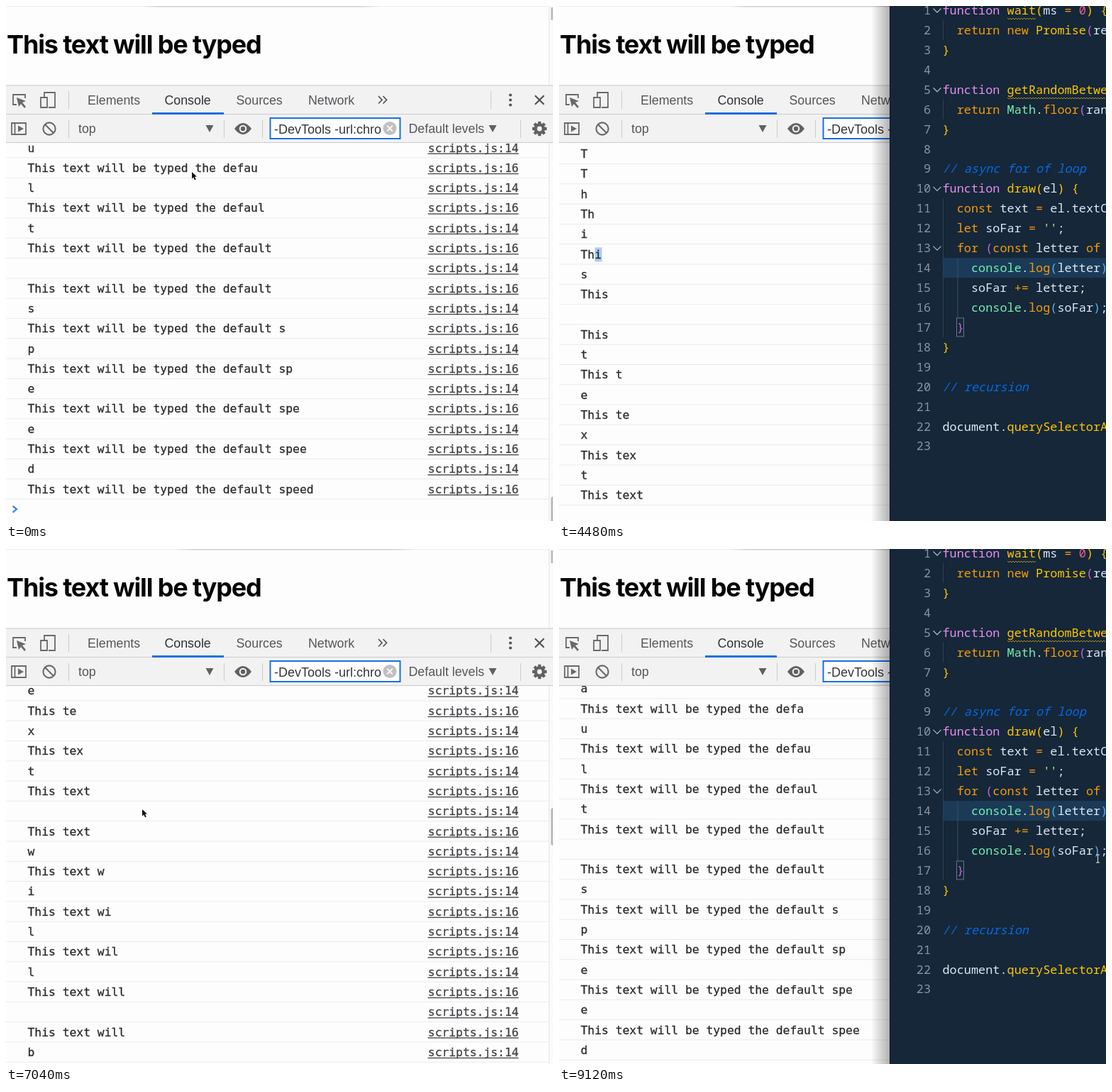
An HTML page with a canvas that plays this animation: 771 by 726 pixels, repeating every 9.28 s.

```html
<!DOCTYPE html>
<html lang="en">
<head>
<meta charset="utf-8">
<title>Console typing log</title>
<style>
  html, body { margin: 0; width: 100%; height: 100%; overflow: hidden; background: #fff; }
  canvas { display: block; }
  h1 {
    position: absolute; left: 1px; top: 36px; margin: 0; white-space: nowrap;
    font: bold 36px/36px Inter, sans-serif; font-optical-sizing: none;
    letter-spacing: -1.15px; color: #050505;
  }
</style>
</head>
<body>
<canvas id="stage" width="771" height="726"></canvas>
<h1>This text will be typed</h1>
<script>
const W = 771, H = 726, LOOP = 9280, STEP = 160;
const ctx = document.getElementById('stage').getContext('2d');
const UI = '17.8px "Liberation Sans", Arial, sans-serif';
const MONO = '16.33px "DejaVu Sans Mono", monospace';
const CODE = '16.86px "Noto Sans Mono", monospace';
const ICON = '#6a6a6a', BLUE = '#1a6fe0', PAPER = '#fefdfe';

// Every letter logs itself, then the text so far.
const logRows = [];
for (const text of ['This text will be typed', 'This text will be typed faster',
                    'This text will be typed the default speed']) {
  for (let i = 0; i < text.length; i++) {
    logRows.push([text[i], 14], [text.slice(0, i + 1), 16]);
  }
}
const ROW = 28.3, TOP = 193, FIRST = 208.4;

const scrollKeys = [[480, 4819.5], [1600, 0], [4960, 0], [5760, 418], [7040, 1650],
                    [7680, 3792], [8320, 4766]];
const mouseKeys = [[480, 262, 234], [1280, 250, 232], [2080, 4, 222], [2400, 40, 266],
                   [2720, 61, 352], [3200, 61, 346], [3840, 70, 460], [4960, 150, 352],
                   [5280, 190, 346], [5760, 190, 346], [7040, 192, 367]];

function track(keys, t) {
  if (t <= keys[0][0]) return keys[0].slice(1);
  for (let i = 1; i < keys.length; i++) {
    const a = keys[i - 1], b = keys[i];
    if (t <= b[0]) {
      const k = (t - a[0]) / (b[0] - a[0]);
      return a.slice(1).map((v, n) => v + (b[n + 1] - v) * k);
    }
  }
  return keys[keys.length - 1].slice(1);
}

function rect(x, y, w, h, color) {
  ctx.fillStyle = color;
  ctx.fillRect(x, y, w, h);
}

function label(text, x, y, color, font = UI, align = 'left') {
  ctx.font = font;
  ctx.fillStyle = color;
  ctx.textAlign = align;
  ctx.fillText(text, x, y);
}

// Log text is a touch heavier than the regular weight.
function logLabel(text, x, y, color) {
  label(text, x, y, color, MONO);
  ctx.strokeStyle = color;
  ctx.lineWidth = 0.3;
  ctx.strokeText(text, x, y);
}

function line(points, color, width = 2, closed = false) {
  ctx.beginPath();
  points.forEach(([x, y]) => ctx.lineTo(x, y));
  if (closed) ctx.closePath();
  ctx.strokeStyle = color;
  ctx.lineWidth = width;
  ctx.stroke();
}

function shape(points, color) {
  ctx.beginPath();
  points.forEach(([x, y]) => ctx.lineTo(x, y));
  ctx.fillStyle = color;
  ctx.fill();
}

function disc(x, y, r, color) {
  ctx.beginPath();
  ctx.arc(x, y, r, 0, 7);
  ctx.fillStyle = color;
  ctx.fill();
}

function ring(x, y, r, color, width) {
  ctx.beginPath();
  ctx.arc(x, y, r, 0, 7);
  ctx.strokeStyle = color;
  ctx.lineWidth = width;
  ctx.stroke();
}

function cross(x, y, r, color, width) {
  line([[x - r, y - r], [x + r, y + r]], color, width);
  line([[x - r, y + r], [x + r, y - r]], color, width);
}

const divider = (x, y) => rect(x, y, 1, 25, '#cbcbcb');
const caretDown = x => shape([[x - 5.5, 168], [x + 5.5, 168], [x, 178]], '#5f6165');

function drawPage(t) {
  const x = t < 640 ? 190 : 238;
  const shade = ctx.createLinearGradient(x, 0, x + 338, 0);
  shade.addColorStop(0, '#d4d4d400');
  shade.addColorStop(0.08, '#d0d0d0');
  shade.addColorStop(0.92, '#d0d0d0');
  shade.addColorStop(1, '#d4d4d400');
  rect(0, 0, W, 1, '#ededed');
  rect(x, 0, 338, 1.5, shade);
  rect(765, 0, 6, 112, '#fafafa');
  rect(765, 0, 1, 112, '#e6e6e6');
  rect(768, 2, 3, 18, '#c2c2c2');
}

function drawTabs() {
  rect(0, 112, W, 41, '#f2f2f2');
  rect(0, 111.5, W, 1, '#c8c8c8');
  rect(0, 152, W, 1, '#cacaca');
  line([[15, 139], [10, 139], [10, 125], [27, 125], [27, 130]], ICON, 1.8);
  shape([[15, 129], [28, 134], [23, 136], [28, 142], [26, 144], [21, 138], [18, 142]], ICON);
  line([[54, 128], [54, 122], [69, 122], [69, 143], [60, 143]], ICON, 1.8);
  line([[49, 129], [58, 129], [58, 143], [49, 143]], ICON, 1.8, true);
  divider(88, 120);
  [['Elements', 115], ['Console', 223.5], ['Sources', 324.5], ['Network', 426]].forEach(([name, x]) =>
    label(name, x, 139, name === 'Console' ? '#303236' : '#54575b'));
  rect(206, 150, 101, 3, BLUE);
  for (const x of [525, 531.5]) line([[x, 127], [x + 5, 132.3], [x, 137.5]], '#5c5c5c', 1.8);
  divider(683, 120);
  for (const y of [125.5, 132.5, 139.5]) disc(711, y, 2.1, '#555');
  cross(752, 132.5, 6.3, '#4e4e4e', 2.1);
}

function drawFilterBar() {
  rect(0, 153, W, 40, '#f2f2f2');
  rect(0, 192, W, 1, '#cacaca');
  line([[8, 165], [28, 165], [28, 181], [8, 181]], ICON, 1.8, true);
  line([[12.5, 165], [12.5, 181]], ICON, 1.8);
  shape([[17, 168.5], [25, 173], [17, 177.5]], ICON);
  ring(61, 173, 8.6, ICON, 2.1);
  line([[55, 167], [67, 179]], ICON, 2.1);
  divider(88, 161);
  label('top', 102, 179, '#54575c');
  caretDown(287);
  divider(307, 161);
  ctx.beginPath();
  ctx.moveTo(322, 173);
  ctx.quadraticCurveTo(334, 157, 346, 173);
  ctx.quadraticCurveTo(334, 189, 322, 173);
  ctx.fillStyle = '#5f6165';
  ctx.fill();
  disc(334, 173, 5.3, '#f2f2f2');
  disc(334, 173, 3.2, '#5f6165');
  divider(361, 161);
  rect(371.5, 157, 185, 31, BLUE);
  rect(373.5, 159, 181, 27, '#fff');
  label('-DevTools -url:chro', 378, 179.5, '#33363a', UI.replace('17.8', '18'));
  disc(541, 172.5, 9.5, '#c0c0c0');
  cross(541, 172.5, 3.8, '#fff', 1.7);
  label('Default levels', 567.5, 179, '#54575c');
  caretDown(686);
  divider(725, 161);
  for (let i = 0; i < 8; i++) {
    const a = i * Math.PI / 4, c = Math.cos(a), s = Math.sin(a);
    line([[752 + 5 * c, 173 + 5 * s], [752 + 10.2 * c, 173 + 10.2 * s]], '#5f6165', 4.4);
  }
  ring(752, 173, 5.6, '#5f6165', 4.4);
}

function drawConsole(scroll, selected) {
  ctx.save();
  ctx.beginPath();
  ctx.rect(0, TOP, W, H - TOP);
  ctx.clip();
  logRows.forEach(([text, source], i) => {
    const y = FIRST + i * ROW - scroll;
    if (y < TOP - 20 || y > H + 20) return;
    rect(0, y + 13.6, 765, 1, '#ebebeb');
    if (selected && i === 5) rect(50.5, y - 9.5, 10, 20, '#a9cdf9');
    logLabel(text, 30.5, y + 5.6, '#2a2c2f');
    logLabel('scripts.js:' + source, 594.8, y + 5.6, '#424447');
    rect(594.5, y + 7.6, 128, 1.4, '#4c4e51');
  });
  const promptY = FIRST + logRows.length * ROW - scroll;
  line([[9.5, promptY - 4.5], [15, promptY], [9.5, promptY + 4.5]], '#3a7de8', 2.2);
  rect(765, TOP, 6, H - TOP, '#fafafa');
  rect(765, TOP, 1, H - TOP, '#e6e6e6');
  ctx.beginPath();
  ctx.roundRect(768, 195 + scroll / 9.7, 6, 53, 3);
  ctx.fillStyle = '#bdbdbd';
  ctx.fill();
  ctx.restore();
}

const ink = { k: '#e58ef0', y: '#ffc600', w: '#dbe8f5', o: '#f79a0c', p: '#f0608a',
              g: '#74eeb2', s: '#a5ff90', c: '#0a68e2', v: '#c266d6', b: '#58aef0' };
// Line number, indent, then pairs of ink and text.
const source = [
  [1, 0, 'k', 'function ', 'y', 'wait', 'y', '(', 'w', 'ms ', 'o', '= ', 'p', '0', 'y', ') {'],
  [2, 2, 'o', 'return new ', 'y', 'Promise', 'v', '(', 'w', 'resolve'],
  [3, 0, 'y', '}'],
  [5, 0, 'k', 'function ', 'y', 'getRandomBetween'],
  [6, 2, 'o', 'return ', 'g', 'Math', 'w', '.', 'o', 'floor', 'v', '(', 'w', 'random'],
  [7, 0, 'y', '}'],
  [9, 0, 'c', '// async for of loop'],
  [10, 0, 'k', 'function ', 'y', 'draw', 'y', '(', 'w', 'el', 'y', ') {'],
  [11, 2, 'o', 'const ', 'w', 'text ', 'o', '= ', 'w', 'el.textContent'],
  [12, 2, 'o', 'let ', 'w', 'soFar ', 'o', '= ', 's', "''", 'w', ';'],
  [13, 2, 'o', 'for ', 'v', '(', 'o', 'const ', 'w', 'letter ', 'o', 'of ', 'w', 'text'],
  [14, 4, 'g', 'console', 'w', '.', 'o', 'log', 'b', '(', 'w', 'letter', 'b', ')', 'w', ';'],
  [15, 4, 'w', 'soFar ', 'o', '+= ', 'w', 'letter;'],
  [16, 4, 'g', 'console', 'w', '.', 'o', 'log', 'b', '(', 'w', 'soFar', 'b', ')', 'w', ';'],
  [17, 2, 'v', '}'],
  [18, 0, 'y', '}'],
  [20, 0, 'c', '// recursion'],
  [22, 0, 'w', 'document.', 'y', 'querySelectorAll']
];
const CHAR = 10.12, CODE_X = 540.5, codeY = n => 6 + (n - 1) * 27.93;

function squiggle(x, end, y) {
  const points = [];
  for (let i = 0; x + i * 2 <= end; i++) points.push([x + i * 2, y + (i % 2 ? 1 : -1)]);
  line(points, '#b08c20', 1);
}

function drawEditor() {
  const shade = ctx.createLinearGradient(440, 0, 466, 0);
  shade.addColorStop(0, 'rgba(0,0,0,0)');
  shade.addColorStop(1, 'rgba(0,0,0,.3)');
  rect(440, 0, 26, H, shade);
  rect(466, 0, W - 466, H, '#152738');
  rect(466, 0, 1, H, '#0d1a28');
  rect(541, codeY(14) - 14, W - 541, 28, '#1b3a57');
  for (const [a, b] of [[2, 2], [6, 6], [11, 17]]) {
    rect(541, codeY(a) - 14, 1, (b - a + 1) * 27.93, '#2a4256');
  }
  rect(561.5, codeY(14) - 14, 1, 84, '#36506a');
  for (let n = 1; n <= 23; n++) label(n, 524, codeY(n) + 6, '#8796a3', CODE, 'right');
  for (const n of [1, 5, 10, 13]) {
    const y = codeY(n);
    line([[527.5, y - 2.5], [533, y + 3], [538.5, y - 2.5]], '#a7b4bf', 1.3);
  }
  ctx.strokeStyle = '#667684';
  ctx.lineWidth = 1;
  ctx.strokeRect(560.5, codeY(17) - 13, 10, 26);
  for (const [n, indent, ...parts] of source) {
    let column = indent;
    for (let i = 0; i < parts.length; i += 2) {
      const slant = parts[i] === 'c' ? 'italic ' : '';
      label(parts[i + 1], CODE_X + column * CHAR, codeY(n) + 6, ink[parts[i]], slant + CODE);
      column += parts[i + 1].length;
    }
  }
  squiggle(632, 672, 18);
  squiggle(632, W, 130);
}

function drawPointer(x, y) {
  const arrow = [[0, 0], [0, 9.4], [2.2, 7.4], [4, 11.2], [5.8, 10.4], [4, 6.8], [6.9, 6.6]]
    .map(([dx, dy]) => [x + dx, y + dy]);
  line(arrow, '#fff', 2, true);
  shape(arrow, '#111');
}

function drawTextCursor(x, y) {
  line([[x, y - 6], [x, y + 5]], '#c8d0d6', 1.2);
  for (const dy of [-6, 5]) line([[x - 2.5, y + dy], [x + 2.5, y + dy]], '#c8d0d6', 1.2);
}

function frame(now) {
  const t = Math.floor(now % LOOP / STEP) * STEP;
  const firstVisit = t >= 4320 && t < 4960, secondVisit = t >= 8640;
  rect(0, 0, W, H, PAPER);
  drawPage(t);
  drawConsole(track(scrollKeys, t)[0], t >= 2880 && t < 4960);
  drawTabs();
  drawFilterBar();
  if (firstVisit || secondVisit) drawEditor();
  else drawPointer(...track(mouseKeys, t));
  if (secondVisit) drawTextCursor(759.5, 437);
  requestAnimationFrame(frame);
}
requestAnimationFrame(frame);
</script>
</body>
</html>
```
